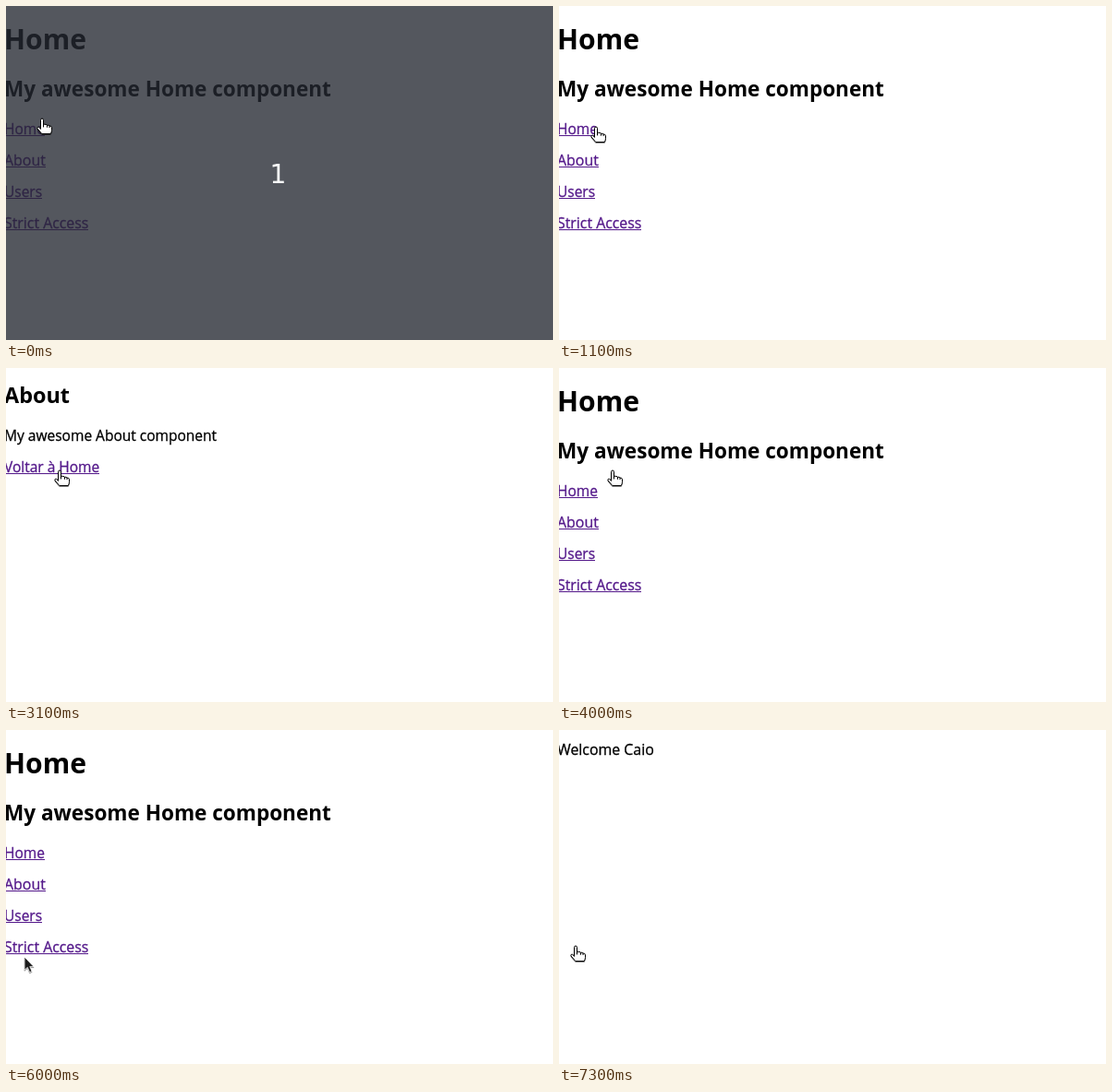
Write an HTML page that moves like this. It is 592 by 362 pixels and loops after 8000 ms.

```html
<!DOCTYPE html>
<html lang="pt">
<head>
<meta charset="utf-8">
<title>Router demo</title>
<style>
html, body { margin: 0; width: 100%; height: 100%; overflow: hidden; background: #fff; }
svg { display: block; }
text { font-family: "Open Sans", "Noto Sans", sans-serif; white-space: pre; }
.body { stroke: #000; stroke-width: .3; }
.head { font-weight: 700; }
.link { fill: #551a8b; }
.link .body { stroke: #551a8b; }
.link.active { fill: #e60f0f; }
.link.active .body { stroke: #e60f0f; }
#shade text { font: 28px "DejaVu Sans", sans-serif; fill: #fff; }
#cursor { filter: drop-shadow(.5px 1px .7px rgba(0, 0, 0, .45)); }
</style>
</head>
<body>
<svg width="592" height="362" viewBox="0 0 592 362">
  <g id="home"></g>
  <g id="about"></g>
  <g id="welcome"></g>
  <g id="shade">
    <rect width="592" height="362" fill="#242831" fill-opacity=".78"/>
    <text x="294.5" y="192" text-anchor="middle">1</text>
  </g>
  <g id="cursor">
    <g id="hand" fill="#fff" stroke="#000" stroke-width="1" stroke-linejoin="round" stroke-linecap="round">
      <path d="M4.5 12V2.6Q4.5 1 6 1T7.5 2.6V7.1L10 7.4Q11.2 7.5 11.5 8.2Q13.4 7.8 14 9Q16.5 8.8 16.5 10.9V13.5Q16.4 15.4 15.3 17.5H5.8L.9 11.8Q.5 10 2.2 10Z"/>
      <path d="M7.5 7.4V10M11.5 8.4V10.3M14 9.2V10.6" fill="none"/>
    </g>
    <path id="arrow" d="M0 0V14.2L3.3 11.3L5.6 16.6L8 15.5L5.8 10.4H10Z" fill="#1c1c1c" stroke="#fff" stroke-width=".8"/>
  </g>
</svg>
<script>
const LOOP = 8000, LEFT = -2;
const byId = id => document.getElementById(id);
const home = byId("home"), about = byId("about"), welcome = byId("welcome");
const pages = { home, about, welcome };

function add(parent, tag, attrs) {
  const el = document.createElementNS("http://www.w3.org/2000/svg", tag);
  for (const key in attrs) el.setAttribute(key, attrs[key]);
  return parent.appendChild(el);
}

function write(page, y, size, label, cls = "body") {
  const el = add(page, "text", { x: LEFT, y, "font-size": size, class: cls });
  el.textContent = label;
  return el;
}

function link(page, y, size, label) {
  const g = add(page, "g", { class: "link" });
  const width = Math.round(write(g, y, size, label).getComputedTextLength());
  add(g, "rect", { x: LEFT, y: y + 1, width, height: 1 });
  return g;
}

write(home, 47, 30.1, "Home", "head");
write(home, 98, 22.55, "My awesome Home component", "head");
const homeLink = link(home, 139, 15.5, "Home");
const aboutLink = link(home, 173, 15.9, "About");
link(home, 207, 15.5, "Users");
const strictLink = link(home, 241, 15.9, "Strict Access");

write(about, 38, 23.4, "About", "head");
write(about, 79, 15.5, "My awesome About component");
const backLink = link(about, 113, 15.5, "Voltar à Home");

write(welcome, 27, 15.9, "Welcome Caio");

const views = [[0, "home"], [2000, "about"], [4000, "home"], [7300, "welcome"]];

// link, pressed at, released at
const presses = [
  [aboutLink, 1900, 2000], [backLink, 3600, 4000],
  [homeLink, 4700, 5000], [strictLink, 7000, 7300]
];

// time, shape, x, y
const moves = [
  [0, "hand", 33, 121], [200, "hand", 35, 124],
  [1100, "hand", 34, 130], [1200, "arrow", 35, 146], [1300, "hand", 25, 160], [1400, "hand", 23, 165],
  [2400, "arrow", 39, 163], [2600, "arrow", 46, 140], [2700, "hand", 50, 118], [3100, "hand", 52, 110],
  [4200, "hand", 45, 117], [4300, "hand", 33, 127], [4400, "hand", 26, 133], [4700, "hand", 24, 136],
  [5300, "arrow", 28, 142], [5500, "hand", 23, 162],
  [5700, "arrow", 26, 181], [5800, "hand", 19, 199], [5900, "hand", 18, 228], [6000, "arrow", 20, 246],
  [6300, "arrow", 19, 244], [6400, "hand", 13, 237], [6500, "hand", 12, 233]
];

const latest = (list, t) => list.filter(item => item[0] <= t).pop();
const show = (el, on) => el.setAttribute("visibility", on ? "visible" : "hidden");

function draw(t) {
  const view = latest(views, t)[1];
  for (const name in pages) show(pages[name], name === view);
  for (const [el, from, to] of presses) el.classList.toggle("active", t >= from && t < to);
  show(byId("shade"), t < 100);
  const [, shape, x, y] = latest(moves, t);
  show(byId("hand"), shape === "hand");
  show(byId("arrow"), shape === "arrow");
  byId("cursor").setAttribute("transform", `translate(${x} ${y})`);
}

const start = performance.now();
function tick() {
  draw((performance.now() - start) % LOOP);
  requestAnimationFrame(tick);
}
tick();
</script>
</body>
</html>
```
